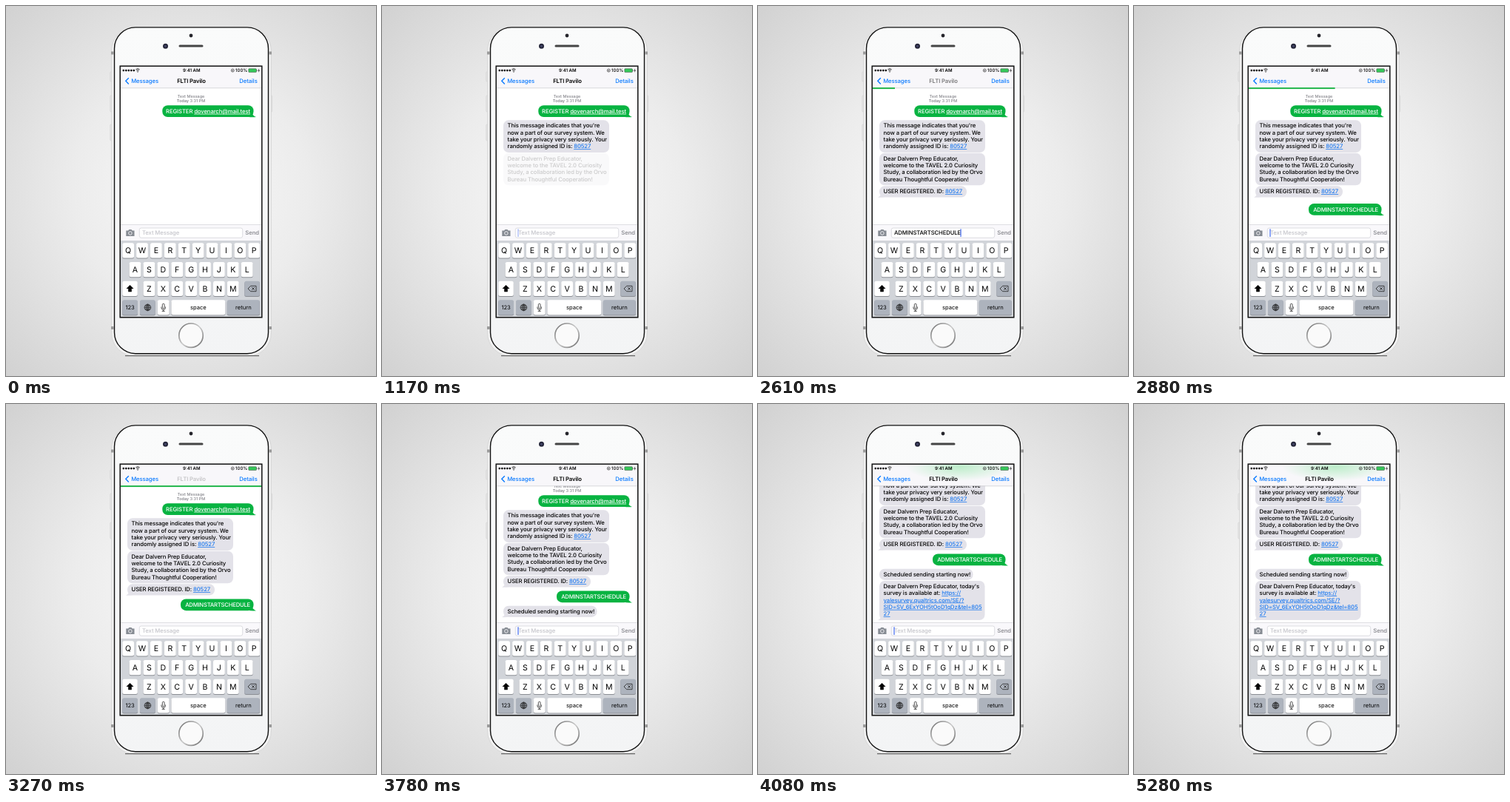
Animation, 500 px wide and 500 px high, one loop 5.31 s. Source, as an HTML page:

```html
<!DOCTYPE html>
<html lang="en">
<head>
<meta charset="utf-8">
<title>Text message survey</title>
<style>
  html, body { margin: 0; width: 100%; height: 100%; overflow: hidden; background: #e4e4e4; }
  svg { display: block; width: 100vw; height: 100vh; }
  text { font: 450 7.7px Inter, "Open Sans", sans-serif; letter-spacing: -.1px; text-rendering: geometricPrecision; fill: #000; }
  .mid { text-anchor: middle; }
  .end { text-anchor: end; }
  .small { font-size: 6px; letter-spacing: 0; }
  .stamp { font-size: 5.5px; letter-spacing: 0; fill: #85858b; }
  .bold { font-weight: 600; }
  .blue { fill: #0a7aff; }
  .white { fill: #fff; }
  .link { fill: #1a78f0; text-decoration: underline; }
  .white .link { fill: #fff; }
  .caps { letter-spacing: -.22px; }
  .key { font-size: 10.6px; font-weight: 400; letter-spacing: 0; }
  .hint { fill: #c4c4ca; }
</style>
</head>
<body>
<svg viewBox="0 0 500 500">
  <defs>
    <radialGradient id="wall" gradientUnits="userSpaceOnUse" cx="250" cy="250" r="355">
      <stop offset="0" stop-color="#f9f9f9"/>
      <stop offset=".45" stop-color="#ececec"/>
      <stop offset="1" stop-color="#d1d1d1"/>
    </radialGradient>
    <linearGradient id="body" x1="0" y1="0" x2="0" y2="1">
      <stop offset="0" stop-color="#fafbfb"/>
      <stop offset="1" stop-color="#f3f4f5"/>
    </linearGradient>
    <linearGradient id="ring" x1="0" y1="0" x2="1" y2="1">
      <stop offset="0" stop-color="#666"/>
      <stop offset=".5" stop-color="#ccc"/>
      <stop offset="1" stop-color="#666"/>
    </linearGradient>
    <radialGradient id="glowFill">
      <stop offset="0" stop-color="#bdedca"/>
      <stop offset="1" stop-color="#bdedca" stop-opacity="0"/>
    </radialGradient>
    <clipPath id="chatClip"><rect x="155" y="110.5" width="190" height="185.5"/></clipPath>
    <clipPath id="headClip"><rect x="155" y="82" width="190" height="28.5"/></clipPath>
  </defs>

  <rect width="500" height="500" fill="url(#wall)"/>

  <!-- phone body -->
  <g fill="#e6e6e6" stroke="#c2c2c2" stroke-width=".4">
    <rect x="140.8" y="89" width="2.4" height="13" rx="1"/>
    <rect x="140.8" y="121" width="2.4" height="22" rx="1"/>
    <rect x="140.8" y="160" width="2.4" height="22" rx="1"/>
    <rect x="357.2" y="121" width="2.4" height="22" rx="1"/>
  </g>
  <rect x="142.5" y="29.5" width="216" height="443.5" rx="31" fill="#f0f0f0" stroke="#d0d0d0" stroke-width=".7"/>
  <path d="M142 63.5h3.5M142 435h3.5M355.5 63.5h3.5M355.5 435h3.5" stroke="#9b9b9b" stroke-width="4"/>
  <path d="M161 472.6h181" stroke="#666" stroke-width="1.1"/>
  <rect x="146.5" y="28.9" width="208" height="440.8" rx="28.5" fill="url(#body)" stroke="#111" stroke-width="1.4"/>
  <circle cx="250" cy="40" r="2.4" fill="#26262c"/>
  <circle cx="215.5" cy="54.3" r="3.5" fill="#25263a"/>
  <circle cx="215.5" cy="54.3" r="1.3" fill="#4b4d73"/>
  <rect x="233.5" y="52.6" width="33" height="3" rx="1.5" fill="#454545"/>
  <circle cx="250" cy="445.2" r="16.2" fill="#fafafa" stroke="url(#ring)" stroke-width="1.7"/>

  <!-- screen -->
  <rect x="154.2" y="81.2" width="191.6" height="339.6" fill="#fff" stroke="#111" stroke-width="1.5"/>
  <g clip-path="url(#chatClip)"><g id="chat">
    <text class="stamp mid" x="250" y="123.5">Text Message</text>
    <text class="stamp mid" x="250" y="129.8"><tspan class="bold">Today</tspan> 3:31 PM</text>
  </g></g>

  <!-- header -->
  <rect x="155" y="82" width="190" height="28.5" fill="#f8f7fa"/>
  <g clip-path="url(#headClip)"><ellipse id="glow" cx="272" cy="85" rx="72" ry="19" fill="url(#glowFill)"/></g>
  <path d="M155 110.8h190" stroke="#bcbcc0" stroke-width=".6"/>
  <g transform="translate(0 .6)">
    <path d="M158.8 86.5h15" stroke="#111" stroke-width="2.7" stroke-linecap="round" stroke-dasharray="0 3.5"/>
    <path d="M175.4 85.3q2.6-2.4 5.2 0M176.5 86.8q1.5-1.3 3 0" fill="none" stroke="#111" stroke-width=".9"/>
    <circle cx="178" cy="88.3" r=".7"/>
    <text class="small bold mid" x="250.7" y="88.8">9:41 AM</text>
    <circle cx="306.3" cy="86.5" r="2" fill="none" stroke="#333" stroke-width=".7"/>
    <circle cx="306.3" cy="86.7" r=".8" fill="#333"/>
    <text class="small end" x="326.3" y="88.8">100%</text>
    <rect x="327.8" y="84.2" width="10.6" height="4.8" rx=".8" fill="#35c759" stroke="#444" stroke-width=".5"/>
    <path d="M339.2 85.7v1.8" stroke="#444" stroke-width=".7"/>
    <path d="M342 83.8l-1.4 3h1l-.4 2.6 1.6-3.2h-1z"/>
  </g>
  <path d="M165.8 97.2l-4 4.1 4 4.1" fill="none" stroke="#0a7aff" stroke-width="1.4"/>
  <text class="blue" x="169.2" y="104">Messages</text>
  <text id="title" class="bold mid" x="250.5" y="104">FLTI Pavilo</text>
  <text class="blue end" x="339.7" y="104">Details</text>
  <rect id="progress" x="155" y="110.2" width="0" height="1.9" fill="#19b544"/>

  <!-- compose bar -->
  <rect x="155" y="295.5" width="190" height="21.5" fill="#f9f8fb"/>
  <path d="M155 295.5h190" stroke="#cbcbd0" stroke-width=".6"/>
  <path d="M162.3 303.6h2.8l1.3-1.6h3l1.3 1.6h2.8v7.4h-11.2z" fill="#868b93"/>
  <circle cx="167.9" cy="307" r="2.3" fill="#868b93" stroke="#f9f8fb" stroke-width=".9"/>
  <rect x="180.3" y="300" width="139.4" height="13.2" rx="2.5" fill="#fff" stroke="#cfcfd5" stroke-width=".7"/>
  <text id="hint" class="hint" x="184" y="309.2">Text Message</text>
  <text id="draft" x="184" y="309.2"></text>
  <rect id="cursor" x="183.4" y="301.3" width="1.2" height="10.6" fill="#4067ee"/>
  <text id="send" class="bold end" x="342" y="309.2">Send</text>

  <g id="keyboard"><rect x="155" y="317" width="190" height="103" fill="#d1d4d9"/></g>
</svg>

<script>
const LOOP = 5310, STEP = 30;
const COMMAND = "ADMINSTARTSCHEDULE";
const $ = id => document.getElementById(id);
const svgNS = "http://www.w3.org/2000/svg";

function add(parent, markup) {
  const g = document.createElementNS(svgNS, "g");
  g.innerHTML = markup;
  return parent.appendChild(g);
}

const link = s => `<tspan class="link">${s}</tspan>`;

function bubble(x, y, w, h, lines, { sent = false, tail = true } = {}) {
  const right = x + w, bottom = y + h;
  const fill = sent ? "#08b341" : "#e3e2e9";
  const tip = sent
    ? `M${right - 5} ${bottom - 8}Q${right} ${bottom - 1} ${right + 3.6} ${bottom}Q${right - 3} ${bottom + .8} ${right - 8} ${bottom - .6}z`
    : `M${x + 5} ${bottom - 8}Q${x + 1} ${bottom - 1} ${x - 2} ${bottom}Q${x + 3} ${bottom + .8} ${x + 8} ${bottom - .6}z`;
  const rows = lines.map((s, i) => sent
    ? `<text class="white end${s === COMMAND ? " caps" : ""}" x="${right - 4.5}" y="${y + 10.5}">${s}</text>`
    : `<text x="${x + 5.6}" y="${y + 9.9 + i * 9.3}">${s}</text>`).join("");
  return add($("chat"),
    `<rect x="${x}" y="${y}" width="${w}" height="${h}" rx="7.2" fill="${fill}"/>` +
    (tail ? `<path class="tail" d="${tip}" fill="${fill}"/>` : "") + rows);
}

bubble(211.3, 134.2, 123.2, 15.8, ["REGISTER " + link("dovenarch@mail.test")], { sent: true });
const welcome = bubble(164, 154.3, 143, 43.8, [
  "This message indicates that you're", "now a part of our survey system. We",
  "take your privacy very seriously. Your", "randomly assigned ID is: " + link("80527")], { tail: false });
const study = bubble(164, 198.7, 143, 43.6, [
  "Dear Dalvern Prep Educator,", "welcome to the TAVEL 2.0 Curiosity",
  "Study, a collaboration led by the Orvo", "Bureau Thoughtful Cooperation!"], { tail: false });
const registered = bubble(164, 243.3, 118, 15.2, ["USER REGISTERED. ID: " + link("80527")]);
const command = bubble(236, 263.4, 98.5, 15.8, [COMMAND], { sent: true });
const scheduled = bubble(164, 283.7, 126.5, 15.2, ["Scheduled sending starting now!"]);
const survey = bubble(164, 300, 142.5, 53, [
  "Dear Dalvern Prep Educator, today's", "survey is available at: " + link("https://"),
  link("yalesurvey.qualtrics.com/SE/?"), link("SID=SV_6ExYOH5tOoD1qDz&amp;tel=805"), link("27")]);

function key(x, y, w, label = "", { dark = false, size = 10.6 } = {}) {
  add($("keyboard"),
    `<rect x="${x}" y="${y + .9}" width="${w}" height="20.3" rx="2.5" fill="#8b8e94"/>` +
    `<rect x="${x}" y="${y}" width="${w}" height="20.3" rx="2.5" fill="${dark ? "#adb3bd" : "#fff"}"/>` +
    `<text class="key mid" style="font-size:${size}px" x="${x + w / 2}" y="${y + 10.2 + size * .36}">${label}</text>`);
}

[["QWERTYUIOP", 165.1, 320.3], ["ASDFGHJKL", 174.5, 346], ["ZXCVBNM", 193.4, 371.7]].forEach(([row, x, y]) =>
  [...row].forEach((c, i) => key(x + i * 18.9 - 7.9, y, 15.8, c)));
key(157.2, 371.7, 20.6);
key(322.3, 371.7, 20.6, "", { dark: true });
key(157.2, 397.3, 20.8, "123", { dark: true, size: 7.6 });
key(181, 397.3, 20.8, "", { dark: true });
key(204.8, 397.3, 15.8);
key(223.4, 397.3, 72.8, "space", { size: 7.6 });
key(298.8, 397.3, 44.1, "return", { dark: true, size: 7.6 });
add($("keyboard"),
  `<path d="M167.5 377l5 5h-2.7v4.2h-4.6v-4.2h-2.7z"/>
   <g fill="none" stroke="#222" stroke-width=".8">
     <path d="M327 382l3.6-3.7h7.4v7.4h-7.4zM332.2 380.2l3.6 3.6M335.8 380.2l-3.6 3.6"/>
     <circle cx="191.4" cy="407.4" r="4.3"/><ellipse cx="191.4" cy="407.4" rx="1.9" ry="4.3"/>
     <path d="M187.1 407.4h8.6M191.4 403.1v8.6M187.9 405h7M187.9 409.8h7"/>
     <path d="M209.9 406.5v1.2q0 2.7 2.8 2.7t2.8-2.7v-1.2M212.7 410.4v2M210.7 412.4h4"/>
     <rect x="211.3" y="402.3" width="2.8" height="6.4" rx="1.4"/>
   </g>`);

// Piecewise linear value through [time, value] points.
function track(t, points) {
  let [t0, v0] = points[0];
  for (const [t1, v1] of points) {
    if (t < t1) return t <= t0 ? v0 : v0 + (v1 - v0) * (t - t0) / (t1 - t0);
    [t0, v0] = [t1, v1];
  }
  return v0;
}
const ramp = (t, from, to) => Math.min(1, Math.max(0, (t - from) / (to - from)));
const ease = p => p * p * (3 - 2 * p);
const opacity = (el, v) => el.setAttribute("opacity", v);

const blink = [[120, 0], [300, 1], [660, 1], [900, 0], [1110, 0], [1230, 1], [1650, 1], [1800, 0],
  [2040, 0], [2041, 1], [3120, 1], [3240, 0], [3570, 0], [3690, 1], [4230, 1], [4470, 0],
  [4650, 0], [4830, 1], [5130, 1], [5280, 0]];

function draw(t) {
  opacity(welcome, ramp(t, 660, 960));
  opacity(study, ramp(t, 1110, 1410));
  opacity(registered, ramp(t, 1350, 1620));
  opacity(scheduled, ramp(t, 3300, 3570));
  opacity(survey, ramp(t, 3780, 4050));
  opacity(scheduled.querySelector(".tail"), 1 - ramp(t, 3780, 3900));

  const rise = ease(ramp(t, 2640, 2940));
  opacity(command, t >= 2640 ? 1 : 0);
  command.setAttribute("transform", `translate(0 ${35 * (1 - rise)})`);

  const lastScroll = ease(ramp(t, 3780, 4050));
  const scroll = 11 * ease(ramp(t, 3300, 3540)) + 50 * lastScroll;
  $("chat").setAttribute("transform", `translate(0 ${-scroll})`);
  opacity($("glow"), lastScroll);

  const typing = t >= 2040 && t < 2640;
  const count = typing ? Math.min(COMMAND.length, Math.floor((t - 2040) / 24) + 1) : 0;
  const draft = $("draft");
  draft.textContent = COMMAND.slice(0, count);
  opacity($("hint"), count ? 0 : 1);
  $("cursor").setAttribute("x", 183.4 + (count ? draft.getComputedTextLength() : 0));
  opacity($("cursor"), track(t, blink));
  $("send").setAttribute("style", `fill:${typing && t < 2520 ? "#19b544" : "#919197"}`);

  opacity($("title"), track(t, [[2550, 1], [2670, 0], [3240, 0], [3390, 1]]));
  $("progress").setAttribute("width", track(t, [[2520, 0], [2610, 30], [3090, 184], [3150, 190]]));
  opacity($("progress"), 1 - ramp(t, 3300, 3450));
}

const start = performance.now();
function frame() {
  const t = (performance.now() - start) % LOOP;
  draw(Math.floor(t / STEP) * STEP);
  requestAnimationFrame(frame);
}
frame();
</script>
</body>
</html>
```
